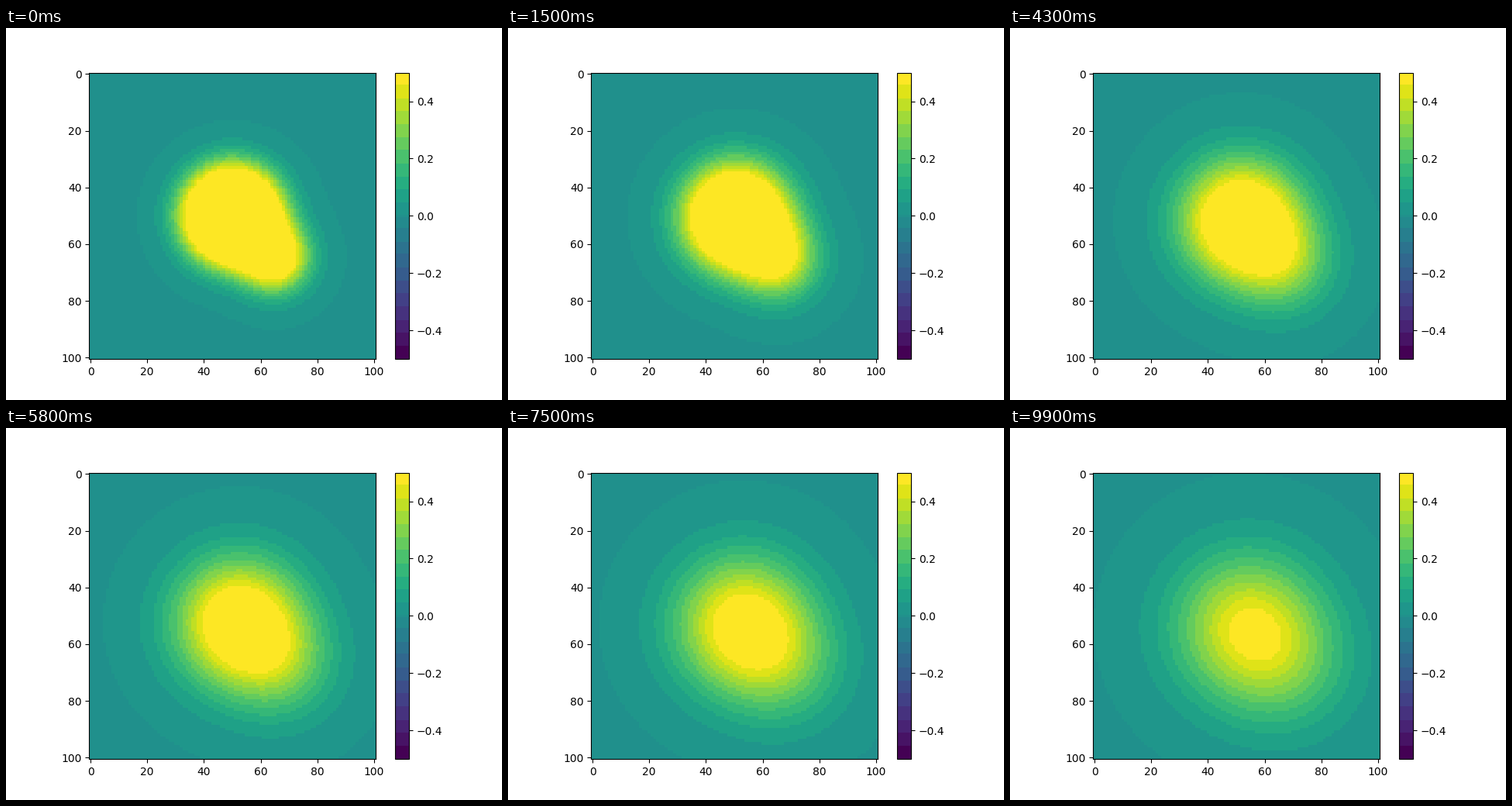
A matplotlib script that plays this animation: 640x480 px, repeating every 10000 ms.

```python
import numpy as np
import matplotlib.pyplot as plt
from matplotlib.animation import FuncAnimation
from matplotlib.colors import ListedColormap

N = 101            # grid cells per side
FRAMES = 100
BANDS = 22         # colour steps
AMP = 1.1          # starting height of the discs
VAR0 = 43.0        # blur variance at the start
SPREAD = 2.0       # variance gained per frame
DRIFT = 0.04       # cells per frame, along both axes
DECAY = 0.0008

grid = np.arange(N)


def disc(cx, cy, radius):
    """Disc with a soft one-cell rim."""
    dist = np.hypot(grid[None, :] - cx, grid[:, None] - cy)
    return np.clip(radius + 0.5 - dist, 0, 1)


def banded_viridis():
    steps = np.arange(256) * BANDS // 256
    colors = plt.get_cmap("viridis")(steps / (BANDS - 1))
    colors[127:129] = plt.get_cmap("viridis")(0.5)  # resting level
    return ListedColormap(colors)


start = AMP * np.maximum(disc(50, 50, 16.9), disc(64.5, 64.5, 9.5))


def field(frame):
    var = VAR0 + SPREAD * frame
    gap = grid[:, None] - grid[None, :] - DRIFT * frame
    kernel = np.exp(-gap**2 / (2 * var)) / np.sqrt(2 * np.pi * var)
    return np.exp(-DECAY * frame) * (kernel @ start @ kernel.T)


fig = plt.figure(figsize=(6.4, 4.8), dpi=100)
ax = fig.add_subplot()
image = ax.imshow(field(0), cmap=banded_viridis(), vmin=-0.5, vmax=0.5,
                  interpolation="nearest")
fig.colorbar(image)


def update(frame):
    image.set_data(field(frame))
    return [image]


anim = FuncAnimation(fig, update, frames=FRAMES, interval=100, repeat=True)
plt.show()
```
